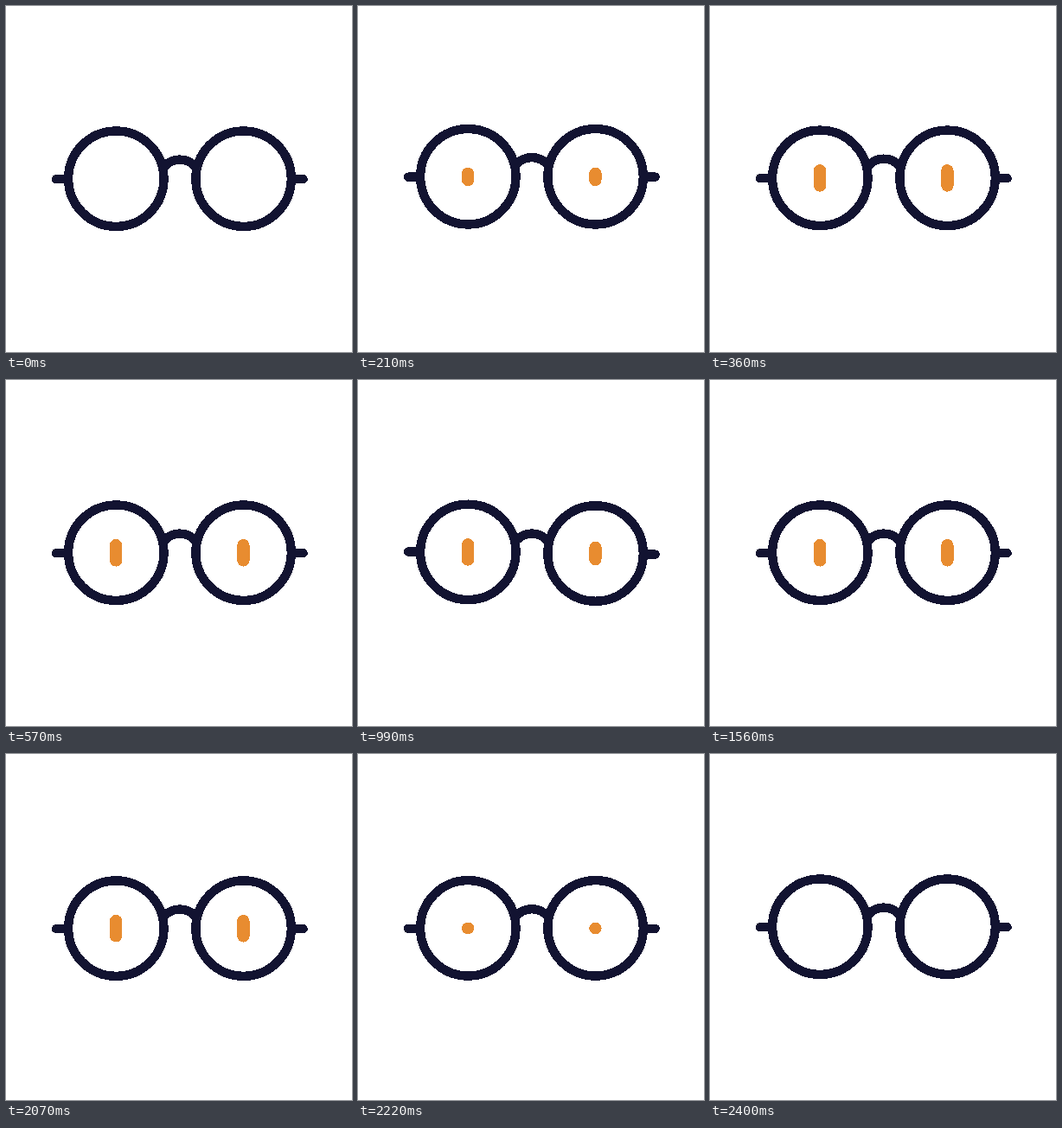
An HTML page that plays this animation: 400 by 400 pixels, repeating every 2460 ms.

```html
<!DOCTYPE html>
<html lang="en">
<head>
<meta charset="utf-8">
<title>Winking glasses</title>
<style>
  html, body { margin: 0; width: 100%; height: 100%; overflow: hidden; background: #fff; }
  svg { display: block; width: 100%; height: 100%; shape-rendering: crispEdges; }
</style>
</head>
<body>
<svg viewBox="0 0 400 400">
  <g id="glasses">
    <g fill="none" stroke="#121331" stroke-width="10.4" stroke-linecap="round">
      <circle cx="127.3" cy="199.7" r="55.2"/>
      <circle cx="274.6" cy="199.7" r="55.2"/>
      <path d="M182.5 186.2A24 24 0 0 1 219.4 186.2M58 200.1H70M332 200.1H343.6"/>
    </g>
    <g fill="#e88c30">
      <rect id="leftEye" x="119.9" width="14.4"/>
      <rect id="rightEye" x="267.2" width="14.4"/>
    </g>
  </g>
</svg>
<script>
const LOOP = 2460, STEP = 30, EYE_HEIGHT = 31.6, EYE_RADIUS = 7.2, EYE_Y = 199.8;
const byId = id => document.getElementById(id);
const glasses = byId('glasses'), leftEye = byId('leftEye'), rightEye = byId('rightEye');

// Keys are [time in ms, value], eased in and out between neighbours.
// The glasses hop with a fading bounce on the way in and again on the way out.
const lift = [
  [0, 0], [135, -17], [270, 8], [405, -4], [560, 0],
  [2030, 0], [2155, 8], [2280, -4], [2400, 0]
];
const open = [[60, 0], [300, 1], [2070, 1], [2340, 0]];
const wink = [[930, 0], [1170, 1], [1350, 1], [1560, 0]];

function track(keys, t) {
  const next = keys.findIndex(key => key[0] > t);
  if (next === 0) return keys[0][1];
  if (next < 0) return keys[keys.length - 1][1];
  const [t0, a] = keys[next - 1], [t1, b] = keys[next];
  const p = (t - t0) / (t1 - t0);
  return a + (b - a) * p * p * (3 - 2 * p);
}

function setEye(eye, scale) {
  const height = EYE_HEIGHT * scale;
  eye.setAttribute('y', EYE_Y - height / 2);
  eye.setAttribute('height', height);
  eye.setAttribute('rx', Math.min(EYE_RADIUS, height / 2));
}

function draw(now) {
  const t = Math.floor(now % LOOP / STEP) * STEP;
  const opened = track(open, t), winked = track(wink, t);
  glasses.setAttribute('transform', `translate(0 ${track(lift, t)}) rotate(${4 * winked} 200.9 199.8)`);
  setEye(leftEye, opened);
  setEye(rightEye, opened * (1 - 0.8 * winked));
}

let start;
function tick(now) {
  start ??= now;
  draw(now - start);
  requestAnimationFrame(tick);
}
draw(0);
requestAnimationFrame(tick);
</script>
</body>
</html>
```
